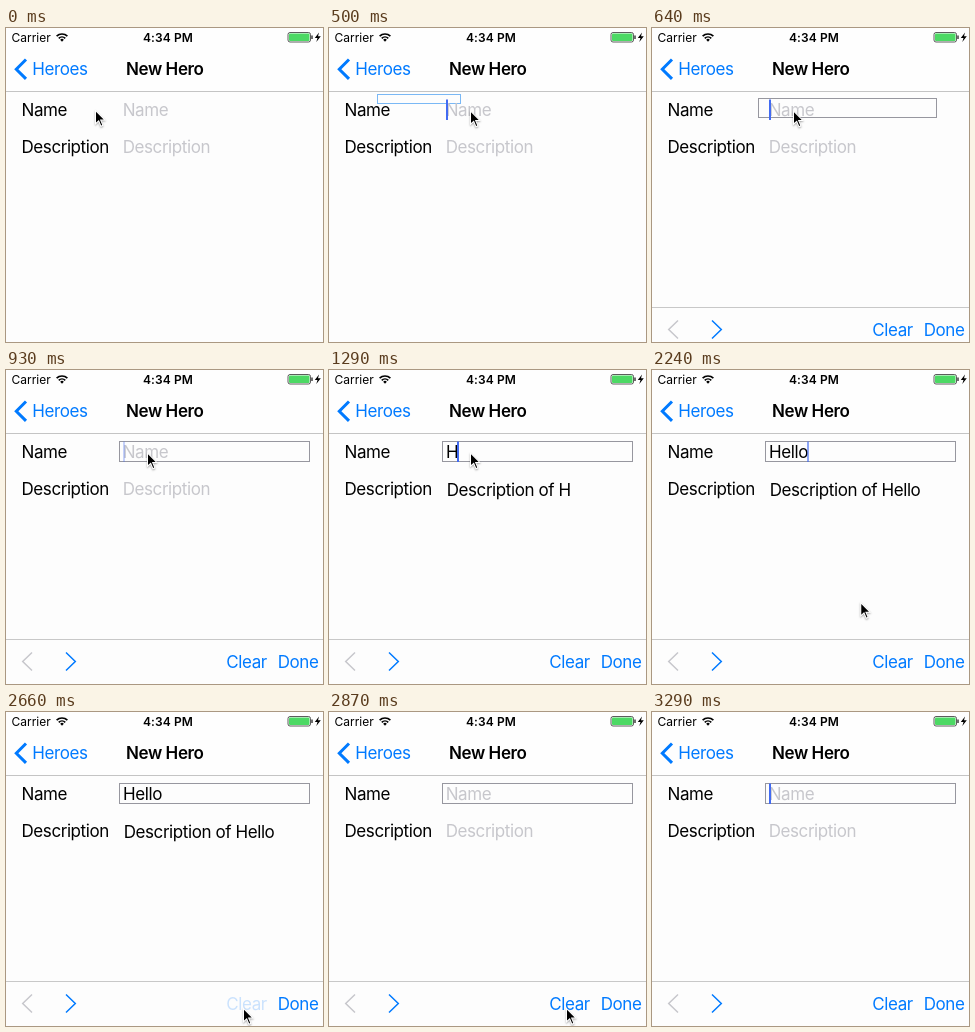
An HTML page with a canvas that plays this animation: 317x314 px, repeating every 3.31 s.

```html
<!DOCTYPE html>
<html lang="en">
<head>
<meta charset="utf-8">
<title>New Hero form</title>
<style>
  html, body { margin: 0; width: 100%; height: 100%; overflow: hidden; background: #fdfdfd; }
  canvas { display: block; width: 317px; height: 314px; }
</style>
</head>
<body>
<canvas id="stage"></canvas>
<script>
const W = 317, H = 314, LOOP = 3310, STEP = 70;
const BLUE = '#007aff', GREY = '#c7c7cc', INK = '#000';
const FONT = 'Inter, "Open Sans", sans-serif';

const canvas = document.getElementById('stage');
const ctx = canvas.getContext('2d');
const dpr = window.devicePixelRatio || 1;
canvas.width = W * dpr;
canvas.height = H * dpr;

// Screen updates come in bursts of 70 ms ticks: [first, last]
const bursts = [[0, 210], [430, 780], [930, 1000], [1220, 1360], [1510, 1580],
  [1730, 1730], [2030, 2870], [3010, 3290]];

// Moments at which the typed text changes
const typing = [[0, ''], [1220, 'H'], [1360, 'He'], [1510, 'Hel'], [1580, 'Hell'],
  [1730, 'Hello'], [2730, '']];

// Caret opacity over time
const blink = [[0, 0], [430, 1], [930, 0.3], [1000, 0], [1220, 1], [2240, 0.6],
  [2310, 0], [3010, 1]];

const clamp = v => Math.max(0, Math.min(1, v));
const span = (t, a, b) => clamp((t - a) / (b - a));
const mix = (a, b, p) => a + (b - a) * p;
const smooth = p => p * p * (3 - 2 * p);
const latest = (list, t) => list.filter(e => e[0] <= t).pop()[1];

function snap(t) {
  const [a, b] = bursts.filter(s => s[0] <= t).pop();
  return Math.min(b, a + Math.floor((t - a) / STEP) * STEP);
}

function text(str, x, y, color = INK, size = 17, weight = 400, spacing = -0.41) {
  ctx.font = `${weight} ${size}px ${FONT}`;
  ctx.letterSpacing = spacing + 'px';
  ctx.fillStyle = color;
  ctx.fillText(str, x, y);
}

function line(points, color, width) {
  ctx.beginPath();
  points.forEach(([x, y]) => ctx.lineTo(x, y));
  ctx.strokeStyle = color;
  ctx.lineWidth = width;
  ctx.stroke();
}

function shape(points, color) {
  ctx.beginPath();
  points.forEach(([x, y]) => ctx.lineTo(x, y));
  ctx.closePath();
  ctx.fillStyle = color;
  ctx.fill();
}

function box(x, y, w, h, color) {
  ctx.fillStyle = color;
  ctx.fillRect(x, y, w, h);
}

function statusBar() {
  text('Carrier', 5.5, 14, INK, 12, 400, 0);
  text('4:34 PM', 137, 14, INK, 12, 600, 0.1);

  // Wi-Fi fan
  const a = Math.PI * 0.25;
  ctx.strokeStyle = INK;
  ctx.lineWidth = 1.7;
  for (const r of [4.6, 7.6]) {
    ctx.beginPath();
    ctx.arc(56, 13.6, r, -Math.PI + a, -a);
    ctx.stroke();
  }
  ctx.beginPath();
  ctx.moveTo(56, 13.8);
  ctx.arc(56, 13.6, 2.6, -Math.PI + a, -a);
  ctx.fillStyle = INK;
  ctx.fill();

  // Battery and charging bolt
  ctx.beginPath();
  ctx.roundRect(282, 4.5, 22.5, 9.5, 2);
  ctx.strokeStyle = '#333';
  ctx.lineWidth = 0.8;
  ctx.stroke();
  ctx.beginPath();
  ctx.roundRect(283, 5.5, 20.5, 7.5, 1);
  ctx.fillStyle = '#4cd964';
  ctx.fill();
  box(305.3, 7.5, 1.4, 3.5, '#333');
  shape([[313, 4.5], [308.8, 10], [311.5, 10], [310.3, 14], [314.8, 8.3], [312, 8.3]], INK);
}

function navBar() {
  box(0, 0, W, 63, '#fefefe');
  box(0, 63, W, 1, '#c4c4c4');
  statusBar();
  line([[20, 31.5], [10.3, 41.2], [20, 50.9]], BLUE, 3);
  text('Heroes', 26.3, 47, BLUE);
  text('New Hero', 120, 47, INK, 17, 600);
}

function fieldRing(t) {
  if (t < 500) return;
  const u = span(t, 430, 710);
  const p = 1 - (1 - u) ** 2;
  ctx.strokeStyle = p < 0.9 ? '#7ab8f5' : '#97979f';
  ctx.lineWidth = 1;
  ctx.strokeRect(Math.round(mix(-2, 113, p)) + 0.5, Math.round(mix(62, 71, p)) + 0.5,
    Math.round(190 * p), Math.round(20 * p));
}

function form(t) {
  const typed = latest(typing, t);
  text('Name', 15.5, 88);
  text('Description', 15.5, 125);
  fieldRing(t);
  if (typed) {
    text(typed, 117, 88);
    text('Description of ' + typed, 117.7, 125.5);
  } else {
    text('Name', 116.7, 87.5, GREY);
    text('Description', 116.7, 125, GREY);
  }
  ctx.font = `400 17px ${FONT}`;
  const caretX = 117 + Math.round(typed ? ctx.measureText(typed).width - 0.8 : 0);
  ctx.globalAlpha = latest(blink, t);
  box(caretX, 71.5, 2, 20.5, '#426bf2');
  ctx.globalAlpha = 1;
}

function toolbar(t) {
  if (t < 570) return;
  // Rides in on top of the keyboard, decelerating
  const y = t >= 780 ? 269 : Math.round(269 + 34 * Math.exp(-(t - 570) / 55));
  box(0, y, W, H - y, '#fdfdfd');
  box(0, y, W, 1, '#c8c8c8');
  line([[26, y + 13.5], [16.7, y + 22.5], [26, y + 31.5]], GREY, 1.5);
  line([[60, y + 13.5], [69.3, y + 22.5], [60, y + 31.5]], BLUE, 1.5);
  const pressed = t >= 2590 && t < 2730;
  ctx.globalAlpha = pressed ? 0.2 : t >= 2730 ? mix(0.4, 1, span(t, 2730, 2870)) : 1;
  text('Clear', 220.3, y + 29, BLUE);
  ctx.globalAlpha = 1;
  text('Done', 271.7, y + 29, BLUE);
}

function pointerAt(t) {
  if (t < 2030) {
    const p = smooth(span(t, 0, 210));
    return [mix(89, 141, p), mix(81.5, 82, p)];
  }
  if (t < 3010) {
    const p = smooth(span(t, 1960, 2520) ** 0.65);
    return [mix(141, 237, p), mix(82, 295.5, p)];
  }
  const p = span(t, 2940, 3290) ** 1.5;
  return [mix(237, 241, p), mix(295.5, 318, p)];
}

function pointer(t) {
  const [x, y] = pointerAt(t);
  const arrow = [[0, 0], [0, 15.4], [3.5, 12.2], [5.7, 17.4], [8.5, 16.2], [6.3, 11.1], [11, 11.1]];
  ctx.save();
  ctx.translate(x, y);
  ctx.shadowColor = 'rgba(0,0,0,0.35)';
  ctx.shadowBlur = 2 * dpr;
  ctx.shadowOffsetY = dpr;
  shape(arrow, '#fff');
  ctx.shadowColor = 'transparent';
  shape([[1, 2.3], [1, 13.1], [3.9, 10.4], [6.2, 16], [7.2, 15.5], [4.9, 10.1], [8.7, 10.1]], INK);
  ctx.restore();
}

function draw(now) {
  const t = snap(now % LOOP);
  ctx.setTransform(dpr, 0, 0, dpr, 0, 0);
  box(0, 0, W, H, '#fdfdfd');
  navBar();
  form(t);
  toolbar(t);
  pointer(t);
}

const start = performance.now();
function tick() {
  draw(performance.now() - start);
  requestAnimationFrame(tick);
}
tick();
</script>
</body>
</html>
```
